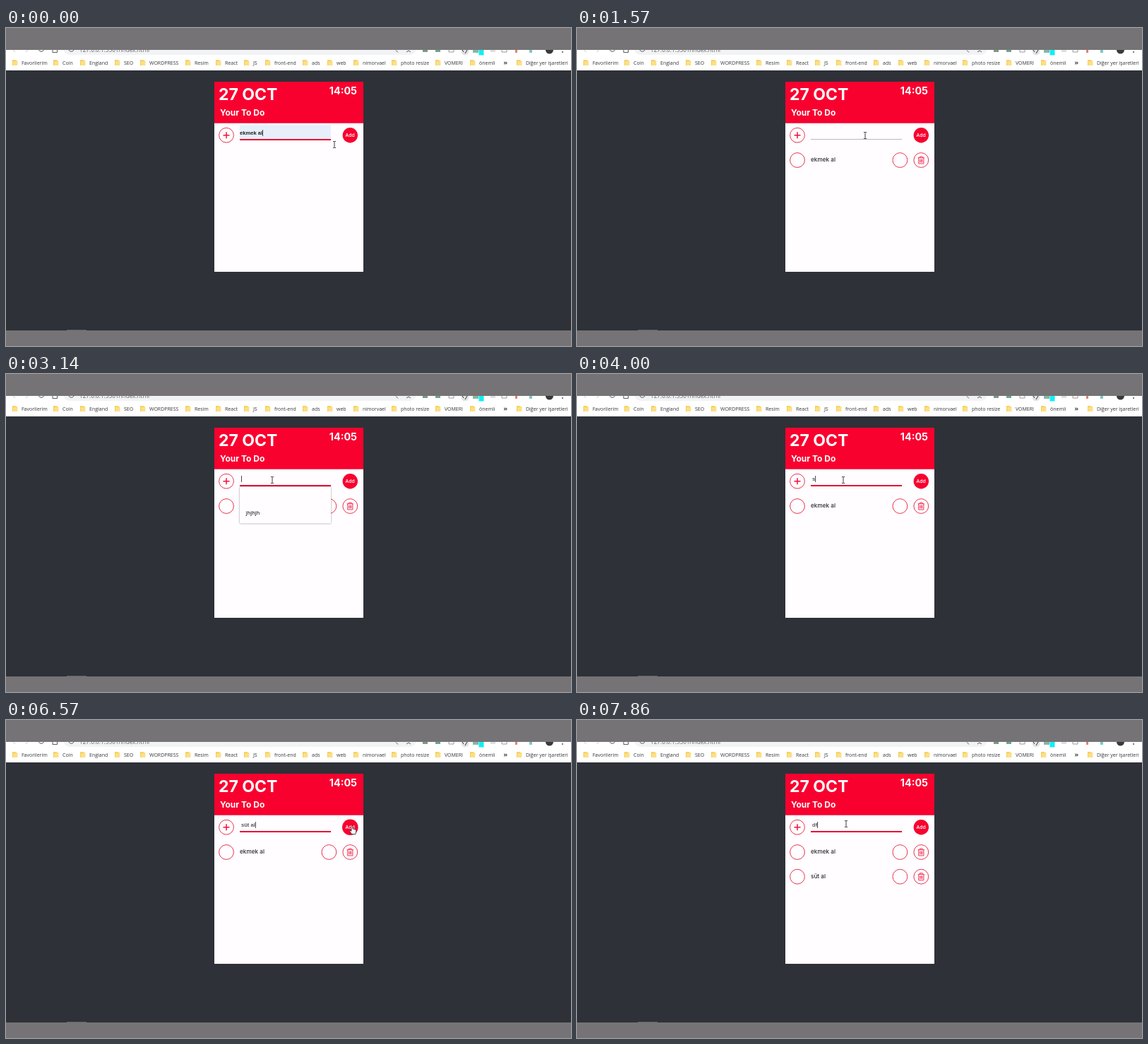
An HTML page that plays this animation: 800x450 px, repeating every 8 s.

```html
<!DOCTYPE html>
<html lang="tr">
<head>
<meta charset="utf-8">
<title>To do list</title>
<style>
  html, body { margin: 0; width: 100%; height: 100%; overflow: hidden; background: #2e3138; }
  svg { display: block; width: 800px; height: 450px; }
  text { white-space: pre; }
  .ui { font-family: "Open Sans", "Noto Sans", sans-serif; }
  .head { font-family: Inter, Roboto, sans-serif; font-weight: 700; fill: #fff; }
  .task { font: 500 8.2px Inter, Roboto, sans-serif; fill: #2c2a30; }
  .field { font: bold 7.6px "Liberation Sans", Arial, sans-serif; }
  .ring { fill: #fffdff; stroke: #e8354f; stroke-width: 1; }
  .line { fill: none; stroke: #f3103a; }
  .shade { filter: drop-shadow(0 .8px 1.2px #0007); }
</style>
</head>
<body>
<svg viewBox="0 0 800 450">
  <defs>
    <g id="folder">
      <path d="M0 0h4.5l1 1H7v6.8H0z" fill="#f3c84f"/>
      <path d="M.8 1.6H7.4V7.8H.8z" fill="#fddf83"/>
    </g>
    <g id="bin" class="line" stroke-width=".85">
      <path d="M-4.6 -3.3H4.6M-1.8 -3.4V-5H1.8V-3.4M-3.6 -3.2V4.9H3.6V-3.2M-1.6 -1.4V3.2M0 -1.4V3.2M1.6 -1.4V3.2"/>
    </g>
    <g id="row">
      <circle class="ring" cx="312" r="10.4"/>
      <circle class="ring" cx="457.4" r="10.4"/>
      <circle class="ring" cx="487.3" r="10.4"/>
      <use href="#bin" x="487.3"/>
    </g>
    <clipPath id="view"><rect y="31" width="800" height="397"/></clipPath>
  </defs>

  <rect width="800" height="450" fill="#757375"/>
  <g clip-path="url(#view)">
    <rect y="31" width="800" height="397" fill="#2e3138"/>
    <rect y="31" width="800" height="29" fill="#fff"/>
    <rect x="81" y="20" width="500" height="18" rx="9" fill="#f1f3f4"/>
    <text class="ui" x="104" y="33.6" font-size="8.2" fill="#66686c">127.0.0.1:5501/index.html</text>
    <g fill="none" stroke="#55575b">
      <path d="M10 31l3 3M28 34l3-3" stroke="#c8c9cb"/>
      <path d="M46.5 31a3.8 3.8 0 0 0 7 0M66 31V34.6H72.5V31M89 31a3.8 3.8 0 0 0 7 0"/>
      <path d="M552 31.5l3 3M567 34l3-2 3 2"/>
      <path d="M627 31V34H634V31M702 31V34H709V31" stroke="#999"/>
    </g>
    <rect x="590" y="31" width="7" height="3" fill="#7b9a83"/>
    <rect x="608" y="31" width="7" height="3" fill="#6da493"/>
    <circle cx="650" cy="33" r="5.5" fill="#e3e4e6"/>
    <path d="M646 31l2 3M653 31l-3 5" stroke="#333"/>
    <rect x="661" y="31" width="8" height="4" fill="#84b8a5"/>
    <rect x="669.5" y="31" width="7" height="7.5" fill="#10eef4"/>
    <rect x="686" y="31" width="7" height="3" fill="#ddd"/>
    <rect x="721" y="31" width="3" height="4" fill="#e48270"/>
    <rect x="741" y="31" width="4" height="4" fill="#7cc9c1"/>
    <circle cx="769.5" cy="31" r="5.5" fill="#393b36"/>
    <circle cx="788" cy="34" r="1" fill="#555"/>
    <g id="bookmarks" class="ui" font-size="7" fill="#35373b"></g>
    <text class="ui" x="704.5" y="51.6" font-size="9" font-weight="700" fill="#444">»</text>

    <rect x="295" y="76" width="211" height="269" fill="#fffdff"/>
    <rect x="295" y="76" width="211" height="58.7" fill="#f8012f"/>
    <text class="head" x="301" y="101.5" font-size="23">27 OCT</text>
    <text class="head" x="457.8" y="94.2" font-size="14.3">14:05</text>
    <text class="head" x="303" y="123.8" font-size="12">Your To Do</text>

    <circle class="ring" cx="312" cy="151.7" r="10.4"/>
    <path class="line" stroke-width="1.5" d="M307.5 151.7h9M312 147.2v9"/>
    <circle id="add" cx="487.3" cy="151.7" r="10.7" fill="#f8012f"/>
    <text class="ui" x="487.3" y="154.2" font-size="7" font-weight="600" fill="#fff" text-anchor="middle">Add</text>

    <rect id="tint" x="331" y="137.5" width="129" height="20" fill="#e7effb"/>
    <rect id="rule" x="331" width="129"/>
    <text id="typed" class="field" y="151.3"></text>
    <rect id="caret" y="144" width=".9" height="9" fill="#333"/>

    <g id="task1" transform="translate(0 187)"><use href="#row"/><text class="task" x="331" y="2.4">ekmek al</text></g>
    <g id="task2" transform="translate(0 221.7)"><use href="#row"/><text class="task" x="331" y="2.4">süt al</text></g>

    <g id="menu">
      <rect class="shade" x="331" y="160" width="129" height="51.5" fill="#fffdff"/>
      <rect id="hover" x="331" y="165" width="129" height="21" fill="#e6e7ea"/>
      <text class="ui" x="339.7" y="199.2" font-size="7.1" font-weight="600" fill="#333">jhjhjh</text>
    </g>

    <g id="pointer">
      <path id="beam" d="M-2 -4.5H-.5L0 -4 .5 -4.5H2M0 -4V4M-2 4.5H-.5L0 4 .5 4.5H2" fill="none" stroke="#333" stroke-width=".95"/>
      <path id="arrow" d="M0 0V9.2L2.1 7.3 3.6 10.6 5.1 9.9 3.6 6.7H6.4Z" fill="#fff" stroke="#222" stroke-width=".8"/>
      <path id="hand" d="M-1 .5Q0 -.8 1 .5V4L5 5Q6 5.4 5.8 7L5 11.5H-.3L-3.5 7.3Q-3 5.8 -1 7.2Z" fill="#fff" stroke="#222" stroke-width=".8"/>
    </g>
    <rect x="86" y="427" width="28" height="1" fill="#65666a"/>
  </g>
</svg>
<script>
const $ = id => document.getElementById(id);
const LOOP = 8000, TICKS = 56;

const bookmarks = {
  Favorilerim: 22, Coin: 80, England: 118, SEO: 167, WORDPRESS: 203, Resim: 267,
  React: 310, JS: 350, 'front-end': 380, ads: 433, web: 468, nimorvael: 505,
  'photo resize': 559, VOMERI: 621, 'önemli': 670, 'Diğer yer işaretleri': 736
};
$('bookmarks').innerHTML = Object.entries(bookmarks).map(([name, x]) =>
  `<use href="#folder" x="${x - 13}" y="45.2"/><text x="${x}" y="51.6">${name}</text>`).join('');

// Pointer hot spot: time, x, y
const path = [
  [0, 465, 165], [140, 465, 165], [570, 490, 151], [1000, 490, 151], [1570, 408, 152],
  [1860, 393, 151], [2140, 390, 151], [2430, 384, 184], [2570, 384, 184], [2860, 377, 150],
  [6000, 377, 150], [6430, 490, 150], [7000, 490, 150], [7570, 381, 147], [LOOP, 381, 147]
];
const typing = [
  [0, 'ekmek al'], [1000, ''], [3860, 's'], [4290, 'sü'], [4570, 'süt'], [5430, 'süt '],
  [5570, 'süt a'], [5710, 'süt al'], [6860, ''], [7710, 'd'], [7860, 'df']
];
const focus = [[0, 860], [1860, 6710], [7570, LOOP]];
const caretOn = [[0, 430], [1860, 2290], [2860, 3570], [3860, 5000], [5430, 6140], [6570, 6710], [7570, LOOP]];

const within = (spans, t) => spans.some(([from, to]) => t >= from && t < to);
const show = (id, on) => $(id).setAttribute('visibility', on ? 'visible' : 'hidden');
const set = (id, attrs) => Object.entries(attrs).forEach(([k, v]) => $(id).setAttribute(k, v));

function pointerAt(t) {
  const i = path.findIndex(p => p[0] > t);
  const [t0, x0, y0] = path[i - 1], [t1, x1, y1] = path[i];
  const u = (t - t0) / (t1 - t0), e = u * u * (3 - 2 * u);
  return [x0 + (x1 - x0) * e, y0 + (y1 - y0) * e];
}

function draw(t) {
  const [x, y] = pointerAt(t);
  const open = t >= 2140 && t < 3860;
  const onAdd = Math.hypot(x - 487.3, y - 151.7) < 11;
  const onField = x > 330 && x < 467 && y > 138 && y < (open ? 159 : 167);
  const onOption = open && y > 165;
  const focused = within(focus, t);

  set('pointer', { transform: `translate(${x} ${y})` });
  show('hand', onAdd);
  show('beam', onField);
  show('arrow', !onAdd && !onField);
  set('add', { r: onAdd ? 11.3 : 10.7 });

  show('tint', t < 1000 || onOption);
  set('rule', focused ? { y: 157, height: 2, fill: '#e90632' } : { y: 157, height: .8, fill: '#aaa8ac' });

  const value = typing.filter(k => k[0] <= t).pop()[1];
  const left = t < 1000 ? 331 : 333;
  $('typed').textContent = value;
  set('typed', { x: left, fill: t < 1000 ? '#222' : '#5a595d' });
  set('caret', { x: left + (value ? $('typed').getComputedTextLength() : 0) });
  show('caret', within(caretOn, t) && !onOption);

  show('task1', t >= 1000);
  show('task2', t >= 6860);
  $('menu').style.display = open ? '' : 'none';
  $('hover').style.display = onOption ? '' : 'none';
}

function frame(now) {
  const tick = Math.min(TICKS - 1, Math.floor(((now % LOOP) + 3) * 7 / 1000));
  draw(Math.round(tick * 100 / 7) * 10);
  requestAnimationFrame(frame);
}
draw(0);
requestAnimationFrame(frame);
</script>
</body>
</html>
```
